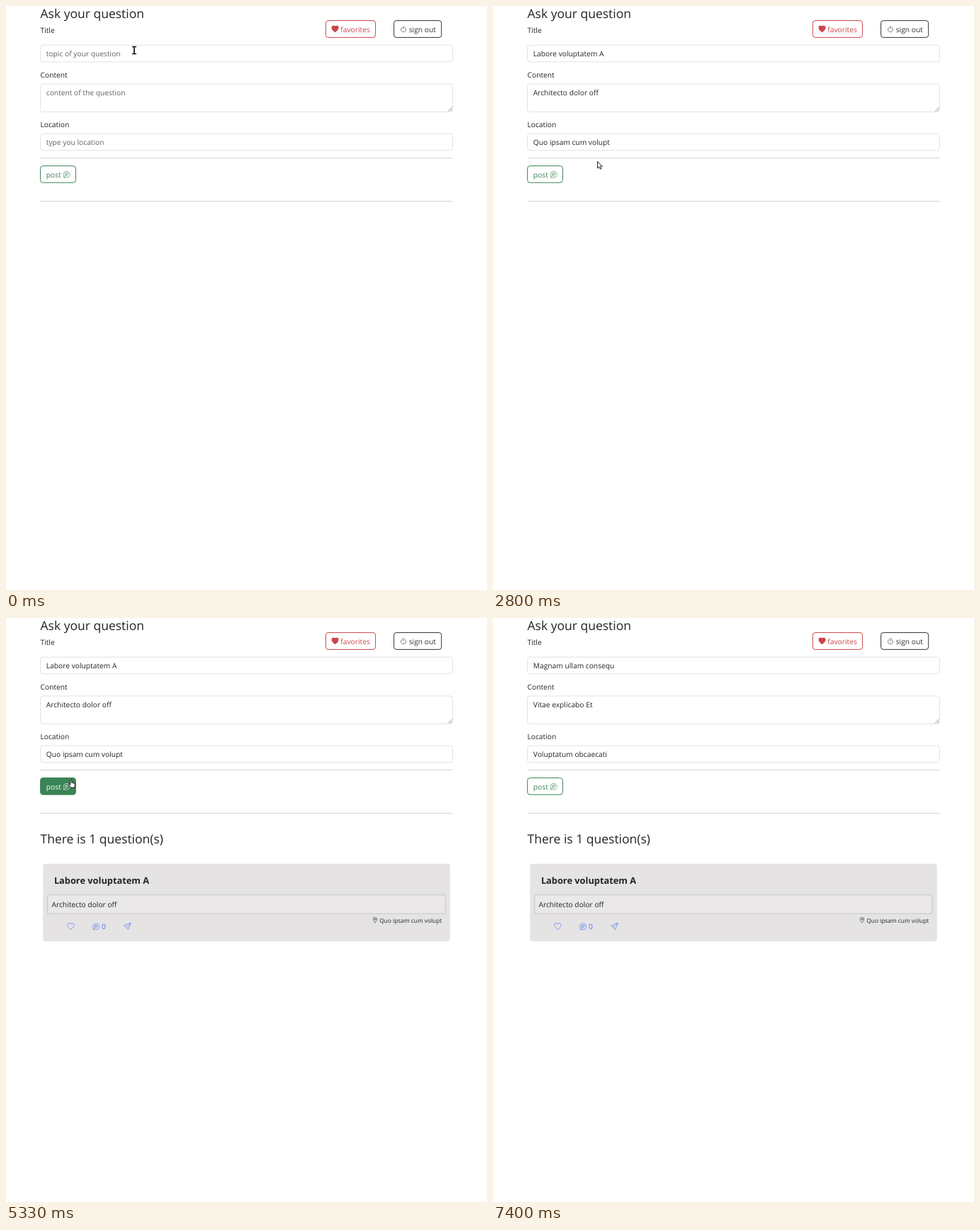
Write an HTML page that moves like this. It is 679 by 824 pixels and loops after 8 s.

```html
<!DOCTYPE html>
<html lang="en">
<head>
<meta charset="utf-8">
<title>Ask your question</title>
<style>
  html, body { margin: 0; width: 100%; height: 100%; overflow: hidden; background: #fff; }
  svg.page { display: block; width: 100%; height: 100%; }
  text {
    font: 10.24px "Open Sans", "Noto Sans", sans-serif;
    fill: #212529;
    text-rendering: geometricPrecision;
    white-space: pre;
  }
  text.head { font-size: 17.5px; }
  text.bold { font-size: 12.8px; font-weight: 700; }
  text.tiny { font-size: 8.34px; }
  .field rect { fill: #fff; stroke: #dfe2e5; }
  .field.empty text { fill: #5f6366; }
  .rule { stroke: #d2d3d4; }
  .btn { --p: 0%; color: color-mix(in srgb, #fff var(--p), var(--c)); }
  .btn rect { fill: color-mix(in srgb, var(--c) var(--p), #fff); stroke: var(--c); }
  .btn text { fill: currentColor; }
  .blue { color: #4a70f3; }
  .blue text { fill: currentColor; }
  .line { fill: none; stroke: currentColor; stroke-linecap: round; stroke-linejoin: round; }
  .pointer path { stroke-linejoin: round; }
</style>
</head>
<body>
<svg class="page" viewBox="0 0 679 824">
  <defs>
    <symbol id="heart" viewBox="0 0 16 16">
      <path fill="currentColor" d="M8 1.314C12.438-3.248 23.534 4.735 8 15-7.534 4.736 3.562-3.248 8 1.314z"/>
    </symbol>
    <symbol id="like" viewBox="0 0 16 16">
      <path class="line" d="M8 2C12 -2 22 5 8 14.4C-6 5 4 -2 8 2z"/>
    </symbol>
    <symbol id="power" viewBox="0 0 16 16">
      <path class="line" d="M8 1.5v6M5.3 4A5.5 5.5 0 1 0 10.7 4"/>
    </symbol>
    <symbol id="chat" viewBox="0 0 16 16">
      <path class="line" d="M2.3 12.2A7.5 6.5 0 1 1 5.6 14.1Q4.2 14.9 1.9 15.2Q2.6 13.6 2.3 12.2zM4.5 5.5h7M4.5 8h7M4.5 10.5h4"/>
    </symbol>
    <symbol id="send" viewBox="0 0 16 16">
      <path class="line" d="M15.5 .5L9.5 15L5.9 10.1L1 6.5zL5.9 10.1"/>
    </symbol>
    <symbol id="pin" viewBox="0 0 16 16">
      <path class="line" d="M8 15.3C5 11.9 2.5 9 2.5 6a5.5 5.5 0 0 1 11 0c0 3-2.5 5.9-5.5 9.3z"/>
      <circle class="line" cx="8" cy="6" r="2.4"/>
    </symbol>
  </defs>

  <text class="head" x="48.5" y="17.1">Ask your question</text>
  <text x="48.5" y="37.7">Title</text>
  <text x="48.5" y="101.2">Content</text>
  <text x="48.5" y="171.2">Location</text>

  <g class="field">
    <rect x="48.5" y="55.2" width="582" height="23.6" rx="3.6"/>
    <text x="56.8" y="71"></text>
  </g>
  <g class="field">
    <rect x="48.5" y="110" width="582" height="39.3" rx="3.6"/>
    <text x="56.8" y="125.8"></text>
    <path d="M624 148.5l5.5-5.5M627 148.5l2.5-2.5" stroke="#777" stroke-width=".8"/>
  </g>
  <g class="field">
    <rect x="48.5" y="180.2" width="582" height="23.6" rx="3.6"/>
    <text x="56.8" y="196"></text>
  </g>

  <path class="rule" d="M48.5 214.5h582M48.5 275.5h582"/>

  <g class="btn" id="fav" style="--c:#cb464b">
    <rect x="451.4" y="20.6" width="70.2" height="23.8" rx="3.6"/>
    <use href="#heart" x="459.4" y="27.4" width="10.4" height="10.4"/>
    <text x="472.3" y="36.5">favorites</text>
  </g>
  <g class="btn" id="out" style="--c:#2f3337">
    <rect x="547.6" y="20.6" width="67.1" height="23.8" rx="3.6"/>
    <use href="#power" x="555.9" y="27.5" width="10.24" height="10.24"/>
    <text x="568.7" y="36.5">sign out</text>
  </g>
  <g class="btn" id="post" style="--c:#3b8456">
    <rect x="48.6" y="225.6" width="49.8" height="23.6" rx="3.6"/>
    <text x="56.8" y="241.5">post</text>
    <use href="#chat" x="80.4" y="232.6" width="10.4" height="10.4"/>
  </g>

  <g id="card">
    <text class="head" x="48.5" y="318">There is 1 question(s)</text>
    <rect x="52.2" y="346.8" width="574.6" height="109.4" rx="4" fill="#e5e3e4"/>
    <text class="bold" x="67.9" y="374.6">Labore voluptatem A</text>
    <rect x="58.7" y="390.7" width="561.3" height="26.4" rx="1" fill="#eae8e9" stroke="#c6c5c6"/>
    <text x="64.5" y="407.9">Architecto dolor off</text>
    <use href="#pin" x="516.8" y="422" width="8.4" height="8.4" color="#212529"/>
    <text class="tiny" x="527.3" y="429.6">Quo ipsam cum volupt</text>
    <g class="blue">
      <use href="#like" x="86.3" y="430" width="10.4" height="10.4"/>
      <use href="#chat" x="122" y="430.2" width="10.4" height="10.4"/>
      <text x="134.9" y="439">0</text>
      <use href="#send" x="166.2" y="430" width="10.4" height="10.4"/>
    </g>
  </g>

  <g id="cursor" class="pointer">
    <path id="arrow" d="M.5 .5v9.3l2.2-2 1.6 3.4 1.6-.8-1.5-3.2h2.9z" fill="#fff" stroke="#1c1c1c"/>
    <g id="beam" fill="none">
      <path d="M-3-5h6M-3 5h6M0-5v10" stroke="#fff" stroke-width="3"/>
      <path d="M-3-5h6M-3 5h6M0-5v10" stroke="#111" stroke-width="1.7"/>
    </g>
    <path id="hand" d="M-1 1.2a1 1 0 0 1 2 0v3.6q1-.6 1.5.3 1-.5 1.5.4 1.4-.3 1.5.9v2.3q0 1.3-.9 2.9h-4.8q-.9-1.9-2.8-3.9-.6-1.4.8-1.2l1.2 1.1z" fill="#fff" stroke="#111"/>
  </g>
</svg>

<script>
const LOOP = 8000, FPS = 15, FADE = 150;
const $ = id => document.getElementById(id);
const clamp = v => Math.max(0, Math.min(1, v));

const fields = [...document.querySelectorAll('.field')];
const texts = [
  ['topic of your question', 'content of the question', 'type you location'],
  ['Labore voluptatem A', 'Architecto dolor off', 'Quo ipsam cum volupt'],
  ['Magnam ullam consequ', 'Vitae explicabo Et', 'Voluptatum obcaecati']
];

// Hover spans in ms
const buttons = [
  { el: $('out'), from: 300, to: 400 },
  { el: $('post'), from: 3125, to: 5350 },
  { el: $('fav'), from: 5890, to: 6180 }
];

// Pointer paths: [tick, x, y]
const paths = [
  [[0, 181, 62.5], [1, 185, 65], [2, 222, 81], [3, 300, 76], [4, 420, 59], [5, 558, 34], [6, 600, 10]],
  [[35, 559, 39], [38, 350, 130], [42, 147, 219], [47, 88, 249.5], [48, 71.5, 239.5],
   [79, 71.5, 239.5], [81, 112, 216], [83, 210, 159], [87, 406, 44], [89, 456, 30], [92, 486, 22]]
];

function locate(tick) {
  const path = paths.find(p => tick >= p[0][0] && tick <= p[p.length - 1][0]);
  if (!path) return null;
  const i = Math.max(1, path.findIndex(p => p[0] >= tick));
  const [a, b] = [path[i - 1], path[i]];
  const u = (tick - a[0]) / (b[0] - a[0]);
  return [a[1] + (b[1] - a[1]) * u, a[2] + (b[2] - a[2]) * u];
}

function inside(group, [x, y]) {
  const r = group.querySelector('rect').getBBox();
  return x >= r.x && x <= r.x + r.width && y >= r.y && y <= r.y + r.height;
}

function hover(b, ms) {
  const peak = Math.min(1, (b.to - b.from) / FADE);
  const u = clamp(Math.min((ms - b.from) / FADE, peak - (ms - b.to) / FADE));
  return u * u * (3 - 2 * u);
}

function draw(tick) {
  const ms = tick * 1000 / FPS;
  const state = tick < 23 ? 0 : tick < 111 ? 1 : 2;
  fields.forEach((f, i) => {
    f.classList.toggle('empty', state === 0);
    f.querySelector('text').textContent = texts[state][i];
  });
  $('card').style.display = tick < 61 ? 'none' : '';

  for (const b of buttons) {
    b.level = hover(b, ms);
    b.el.style.setProperty('--p', b.level * 100 + '%');
  }

  const pos = locate(tick);
  $('cursor').style.display = pos ? '' : 'none';
  if (!pos) return;
  const kind = buttons.some(b => b.level > 0 && inside(b.el, pos)) ? 'hand'
    : fields.some(f => inside(f, pos)) ? 'beam' : 'arrow';
  for (const k of ['arrow', 'beam', 'hand']) $(k).style.display = k === kind ? '' : 'none';
  $('cursor').setAttribute('transform', `translate(${pos})`);
}

let last = -1;
const start = performance.now();
function loop(now) {
  const t = Math.max(0, now - start) % LOOP;
  const tick = Math.floor((t + 4) * FPS / 1000) % (LOOP * FPS / 1000);
  if (tick !== last) draw(last = tick);
  requestAnimationFrame(loop);
}
draw(0);
requestAnimationFrame(loop);
</script>
</body>
</html>
```
